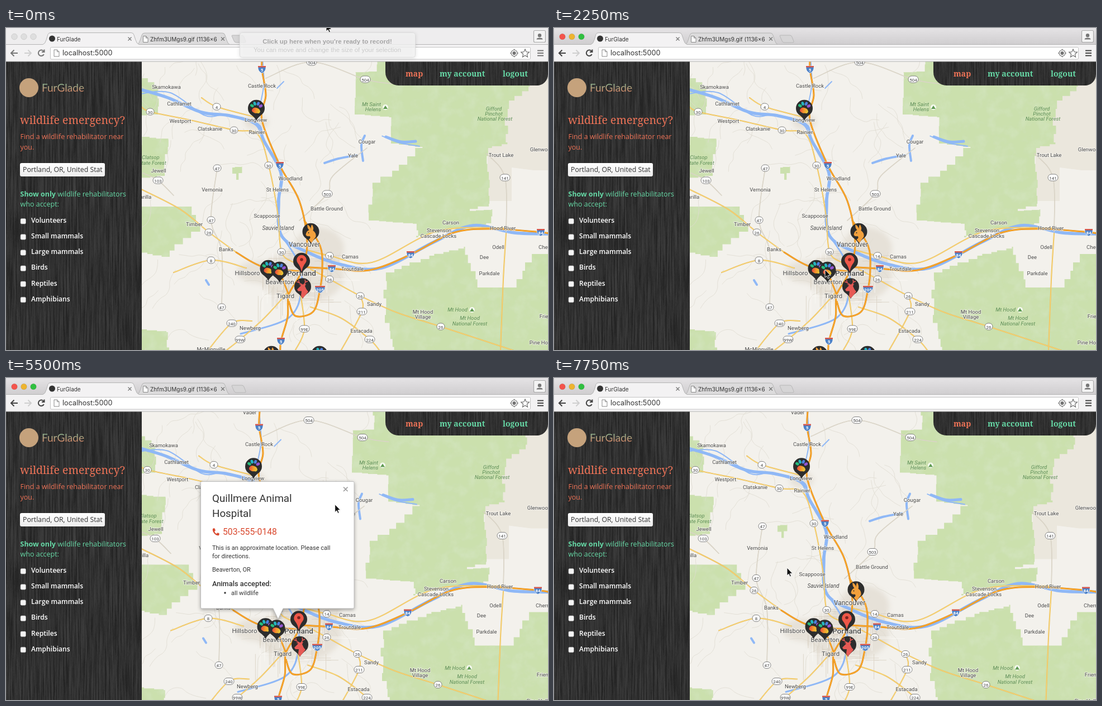
An HTML page for the animation above (8 s loop, 970 by 577 pixels).

```html
<!DOCTYPE html>
<html lang="en">
<head>
<meta charset="utf-8">
<title>FurGlade</title>
<style>
html, body { margin: 0; width: 100%; height: 100%; overflow: hidden; background: #f3f1ec }
svg { display: block; width: 970px; height: 577px }
text { white-space: pre }
.ui { font-family: Inter, sans-serif; fill: #333 }
.side { font-family: "Open Sans", sans-serif }
.slab { font-family: "Noto Serif", serif }
.pop { font-family: Roboto, sans-serif; fill: #333 }
.note { font: 11.45px "Liberation Sans", sans-serif; text-anchor: middle }
#labels text { font-family: Roboto, sans-serif; text-anchor: middle; fill: #4b4b4b; stroke: #f8f6f2; stroke-width: 2px; stroke-opacity: .7; paint-order: stroke }
#labels .park { fill: #5f8f58; font-style: italic; stroke: none }
#shields text { font: 8px Roboto, sans-serif; text-anchor: middle; fill: #444 }
#shields .us { fill: #fff; font-weight: 700 }
</style>
</head>
<body>
<svg viewBox="0 0 970 577">
<defs>
  <filter id="hills" filterUnits="userSpaceOnUse" x="230" y="30" width="760" height="570">
    <feTurbulence type="fractalNoise" baseFrequency=".045" numOctaves="4" seed="8"/>
    <feColorMatrix values="0 0 0 0 .64  0 0 0 0 .77  0 0 0 0 .5  2 0 0 0 -.85"/>
    <feComposite in2="SourceAlpha" operator="in" result="n"/>
    <feMerge><feMergeNode in="SourceGraphic"/><feMergeNode in="n"/></feMerge>
  </filter>
  <filter id="wood" filterUnits="userSpaceOnUse" x="0" y="60" width="970" height="517">
    <feTurbulence type="fractalNoise" baseFrequency=".4 .012" numOctaves="3" seed="3"/>
    <feColorMatrix values="0 0 0 0 .08  0 0 0 0 .08  0 0 0 0 .08  1 0 0 0 -.3"/>
    <feComposite in2="SourceAlpha" operator="in" result="n"/>
    <feMerge><feMergeNode in="SourceGraphic"/><feMergeNode in="n"/></feMerge>
  </filter>
  <filter id="soft"><feGaussianBlur stdDeviation="5"/></filter>
  <linearGradient id="brand" x2="0" y2="1"><stop stop-color="#74bf9b"/><stop offset="1" stop-color="#e8805f"/></linearGradient>
  <linearGradient id="field" x2="0" y2="1"><stop stop-color="#fff"/><stop offset="1" stop-color="#ececec"/></linearGradient>
  <linearGradient id="strip" x2="0" y2="1"><stop stop-color="#e5e3e5"/><stop offset="1" stop-color="#cfcdcf"/></linearGradient>
  <linearGradient id="pad"><stop stop-color="#e8483f"/><stop offset=".5" stop-color="#f59a2c"/><stop offset="1" stop-color="#e3cf3a"/></linearGradient>
</defs>

<g id="map">
  <rect x="230" y="30" width="760" height="570" fill="#f3f1ec"/>
  <g fill="#e6e1d8" filter="url(#soft)">
    <ellipse cx="530" cy="445" rx="75" ry="48"/><ellipse cx="560" cy="395" rx="45" ry="38"/><ellipse cx="455" cy="437" rx="42" ry="20"/><ellipse cx="448" cy="168" rx="22" ry="14"/>
  </g>
  <path fill="#ebe7dd" d="M890 40H980V255H945L905 250V310H862V200H890Z"/>
  <g id="forest" fill="#cbe0ad" filter="url(#hills)"></g>
  <g id="lanes" fill="none"></g>
  <g id="water" fill="none" stroke="#8fb8f6" stroke-linecap="round"></g>
  <g id="roads" fill="none" stroke-linecap="round"></g>
  <g id="shields"></g>
  <g id="labels"></g>
  <g id="pins"></g>
</g>

<g id="popup">
  <path d="M348.500 187.500a2 2 0 0 1 2-2h270.500a2 2 0 0 1 2 2v223.500a2 2 0 0 1-2 2H496l-9 19-9-19H350.500a2 2 0 0 1-2-2Z" fill="#fff" stroke="#bdbdbd" style="filter:drop-shadow(0 2px 3px #0005)"/>
  <path id="close" d="M604 195.500l7.500 7.500m0-7.500l-7.500 7.500" stroke-width="1.600"/>
  <g class="pop" font-size="11">
    <g font-size="18.800"><text x="369" y="222">Quillmere Animal</text><text x="369" y="249">Hospital</text></g>
    <path d="M370 270l3-1 2 4-2 2q1 3 4 4l2-2 3 2-1 3q-3 1-7-2-5-5-4-10Z" fill="#d9492f"/>
    <text x="388" y="281" font-size="15.700" fill="#d9492f">503-555-0148</text>
    <text x="369" y="307.500">This is an approximate location. Please call</text>
    <text x="369" y="323">for directions.</text>
    <text x="369" y="347">Beaverton, OR</text>
    <text x="369" y="372.500" font-size="12.800" font-weight="500">Animals accepted:</text>
    <circle cx="392" cy="385" r="1.700"/><text x="403" y="388.500">all wildlife</text>
  </g>
</g>

<path filter="url(#wood)" fill="#282828" d="M0 60H243V577H0ZM679 60H970V83a20 20 0 0 1-20 20H703a24 24 0 0 1-24-24Z"/>
<g class="slab" font-size="14" font-weight="600" fill="#66d9a6">
  <text x="715" y="87" fill="#ee7357">map</text><text x="776" y="87">my account</text><text x="889" y="87">logout</text>
</g>
<circle cx="41" cy="107" r="17" fill="#c5a27c"/>
<text x="64" y="114" font-family="Lato, sans-serif" font-size="19" fill="url(#brand)">FurGlade</text>
<text class="slab" x="25" y="172" font-size="19.500" fill="#ee7357">wildlife emergency?</text>
<g class="side" font-size="12.500">
  <g fill="#ee7357"><text x="25.500" y="199">Find a wildlife rehabilitator near</text><text x="25.500" y="218">you.</text></g>
  <rect x="25" y="242" width="152" height="24" rx="3" fill="url(#field)"/>
  <text x="30" y="258" font-size="12.300" fill="#333">Portland, OR, United Stat</text>
  <g fill="#66d9a6"><text x="25.500" y="301.500"><tspan font-weight="700">Show only</tspan> wildlife rehabilitators</text><text x="25.500" y="320">who accept:</text></g>
  <g id="kinds" fill="#fff" font-size="12.100" font-weight="600"></g>
</g>

<g id="chrome">
  <rect id="bar" width="970" height="30"/>
  <path d="M234 30q4-1 6-8l3-9q1-4 5-4H387q4 0 5 4l3 9q2 7 6 8Z" fill="#dcdbdc" stroke="#b4b4b4"/>
  <path d="M404 14q0-1 2-1h16q3 0 4 3l3 8q1 2-2 2H412q-3 0-4-3Z" fill="#d6d5d6" stroke="#b8b8b8"/>
  <path d="M-1 60V29.500H66q4-1 6-8l3-10q1-3 5-3H224q4 0 5 4l3 9q2 7 6 8H971V60Z" fill="#f3f2f3" stroke="#b4b4b4"/>
  <g id="lights" stroke-width=".8"></g>
  <circle cx="82.500" cy="19" r="5.500" fill="#333"/>
  <g class="ui" font-size="10"><text x="91" y="23.500">FurGlade</text><text x="258" y="23.500">Zhfm3UMgs9.gif (1136×6</text></g>
  <path d="M218.500 16.500l6 6m0-6l-6 6M385 16.500l6 6m0-6l-6 6" stroke="#777" stroke-width="1.300"/>
  <rect x="79.500" y="34.500" width="859" height="21.500" rx="2" fill="#fff" stroke="#c3c3c3"/>
  <path d="M245.500 14.500h5l3.500 3.500v7.500h-8.500ZM250.500 14.500v3.500h3.500M86 39h5.500l3.500 3.500v8.500h-9ZM91.500 39v3.500h3.500" fill="#fff" stroke="#888"/>
  <text class="ui" x="101" y="49" font-size="12.700">localhost:5000</text>
  <g id="tools" fill="none" stroke-width="2">
    <path d="M21 45H9M14.500 39.500L9 45l5.500 5.500"/>
    <path d="M33 45H45M39.500 39.500L45 45l-5.500 5.500" stroke="#cfcfcf"/>
    <path d="M67.500 42A5.200 5.200 0 1 0 67.800 47M68.500 38.500V43H64M951 40.500H962M951 45H962M951 49.500H962"/>
  </g>
  <g fill="none" stroke="#6d6d6d" stroke-width="1.200">
    <circle cx="909.500" cy="45" r="5.500"/><circle cx="909.500" cy="45" r="2.500" fill="#777"/>
    <path d="M902 45h2m11 0h2M909.500 37.500v2m0 11v2"/>
    <path d="M929 38l2.100 4.800 5.200.5-3.900 3.500 1.100 5.100-4.500-2.700-4.500 2.700 1.100-5.100-3.900-3.500 5.200-.5Z"/>
    <rect x="944.500" y="4.500" width="21" height="21" rx="2" fill="#f3f3f3" stroke="#aaa"/>
  </g>
  <path d="M955 10a3 3 0 0 1 0 6.400 3 3 0 0 1 0-6.400M949.500 20.500q0-3 5.500-3t5.500 3Z" fill="#777"/>
</g>
<g id="notice">
  <rect x="418.500" y="8.500" width="314" height="44" rx="4" fill="#f4f4f4" fill-opacity=".82" stroke="#ddd" style="filter:drop-shadow(0 1px 3px #0002)"/>
  <g class="note"><text x="575" y="28" font-weight="700" fill="#a5a5a5">Click up here when you're ready to record!</text><text x="575" y="43" fill="#cbcbcb">You can move and change the size of your selection</text></g>
</g>
<path id="cursor" d="M0 0V14L3.200 11.200 5.300 16 7.500 15 5.400 10.300H9.800Z" fill="#111" stroke="#fff" stroke-width=".9"/>
</svg>
<script>
const $ = id => document.getElementById(id);
const add = (id, html) => $(id).insertAdjacentHTML('beforeend', html);

let seed = 11;
const rnd = () => (seed = seed * 16807 % 2147483647) / 2147483647;
const jitter = n => (rnd() - .5) * n;
const parse = s => s.split(' ').map(q => q.split(',').map(parseFloat));

// Catmull-Rom curve through the points
function curve(p) {
  let d = 'M' + p[0];
  for (let i = 1; i < p.length; i++) {
    const a = p[i - 2] || p[i - 1], b = p[i - 1], c = p[i], e = p[i + 1] || c;
    const pull = (k, from, to, at) => at[k] + (to[k] - from[k]) / 6;
    d += `C${[0, 1].map(k => pull(k, a, c, b))} ${[0, 1].map(k => pull(k, e, b, c))} ${c}`;
  }
  return d;
}
const line = (id, p, color, w) => add(id, `<path d="${curve(p)}" stroke="${color}" stroke-width="${w}"/>`);

// Forest edges follow survey squares: ragged steps between corners
function forest(corners) {
  const p = parse(corners);
  let d = 'M' + p[0];
  p.forEach(([x, y], i) => {
    const [u, v] = p[(i + 1) % p.length];
    const n = Math.ceil(Math.max(Math.abs(u - x), Math.abs(v - y)) / 16);
    for (let k = 1; k <= n; k++) d += `H${x + (u - x) * k / n + jitter(7)}V${y + (v - y) * k / n}`;
  });
  add('forest', `<path d="${d}Z"/>`);
}
[
  '665,40 665,78 626,80 626,155 685,160 692,207 745,215 720,245 658,288 650,345 740,352 862,315 862,215 895,205 897,130 935,105 935,40',
  '735,350 750,332 870,325 870,350 800,362 735,375',
  '680,438 755,408 820,392 845,465 905,465 940,405 985,405 985,600 702,600 678,500',
  '240,195 288,200 285,265 240,270',
  '240,320 325,320 345,365 290,410 240,400',
  '240,90 275,112 270,155 240,158',
  '240,540 285,545 290,600 240,600',
  '403,250 423,248 415,272'
].forEach(forest);

// Country lanes wander, city streets form a loose grid
for (let i = 0; i < 70; i++) {
  let x = 245 + rnd() * 410, y = 50 + rnd() * 530, a = rnd() * 6.3;
  const p = [];
  for (let j = 0; j < 8; j++) {
    p.push([x, y]);
    a += jitter(1.4);
    x += 12 * Math.cos(a);
    y += 12 * Math.sin(a);
  }
  line('lanes', p, '#dfdbd1', .8);
}
for (let i = 0; i < 90; i++)
  add('lanes', `<path d="M${520 + jitter(140)} ${445 + jitter(95)}${i % 2 ? 'h' : 'v'}${15 + rnd() * 35}" stroke="${i % 3 ? '#d9d0c2' : '#fbfaf7'}" stroke-width=".8"/>`);

// Wide rivers get a thin side channel that weaves around them
function river(w, pts) {
  const p = parse(pts);
  line('water', p, '#8fb8f6', w);
  if (w > 4) line('water', p.slice(0, 8).map(([x, y]) => [x + jitter(14), y + jitter(18)]), '#8fb8f6', 2);
}
river(5.5, '240,110 290,125 350,151 400,157 447,172 462,203 492,260 488,310 493,372 540,402 600,424 672,430 765,384 835,354 910,367 980,369');
river(3, '493,372 523,420 529,470 505,520 420,548');
river(2, '458,45 461,105 446,170');
river(4, '570,242 595,234 628,228');
river(4, '642,193 636,210 639,238');
river(5, '680,195 707,204 733,203');
river(2, '485,108 497,96');
river(4, '358,452 363,460');

// Route sign: white oval for state roads, shield for interstates
function sign(n, [x, y], interstate) {
  const w = n.length > 2 ? 9 : 7;
  const shape = interstate
    ? `<path d="M${-w}-6H${w}Q${w + 1} 4 0 7Q${-w - 1} 4 ${-w}-6Z" fill="#4a7fc6" stroke="#fff" stroke-width=".7"/><path d="M${-w}-6H${w}V-3.500H${-w}Z" fill="#d5584d"/>`
    : `<rect x="${-w}" y="-6" width="${2 * w}" height="12" rx="6" fill="#fff" stroke="#777" stroke-width=".9"/>`;
  add('shields', `<g transform="translate(${x} ${y})">${shape}<text class="${interstate ? 'us' : ''}" y="3.500">${n}</text></g>`);
}
// Each road: route number, then points; a star puts up a sign
function roads(list, edge, fill, w, interstate) {
  for (const row of list) {
    const [n, ...stops] = row.split(' '), p = parse(stops.join(' '));
    line('roads', p, edge, w);
    line('roads', p, fill, w - 1);
    stops.forEach((s, i) => s.endsWith('*') && sign(n, p[i], interstate));
  }
}
roads([
  '504 465,90 547,61* 643,92* 690,100',
  '503 525,345 575,297* 585,265 646,215',
  '47 378,251* 367,344* 386,400 386,500*',
  '103 245,260 272,273* 300,300',
  '141 860,225 893,268* 895,365'
], '#d3cdbf', '#e4dfd4', 1.6);
roads([
  '30 240,139 258,150* 330,165 408,183* 450,190 470,246* 486,330 493,401* 515,420',
  '4 350,125 377,141* 447,160',
  '26 240,288 312,325 363,366* 412,402',
  '8 300,438 367,416* 430,430',
  '14 540,398 579,408* 655,420 772,364 890,358',
  '26 545,432 579,450* 634,480* 700,510 778,535* 915,580',
  '99W 503,475 462,520 419,558* 395,577',
  '99E 526,470 534,539* 518,577',
  '240 440,525 404,529* 362,577',
  '211 634,480 637,508* 600,577',
  '224 545,500 600,520 651,558* 670,580',
  '35 895,368 890,450 885,577'
], '#e6b655', '#fbd978', 2.1);
roads(['26 412,402 460,428 527,436', '217 489,435 506,478'], '#dc8a1c', '#f9a62b', 2.8);
roads([
  '5 459,45 458,74* 465,120 458,165 490,246* 525,310 539,385 527,440 506,478 504,518 492,561* 491,585',
  '205 534,345 562,390 566,430 562,468* 550,508 518,516 506,490',
  '84 527,428 583,431* 650,434 724,406* 800,367 870,360 957,366* 980,370'
], '#dc8a1c', '#f9a62b', 3, true);

function label(list, size, extra = '') {
  for (const [name, x, y] of list.split('|').map(s => s.split(',')))
    add('labels', `<text x="${x}" y="${+y + size * .35}" font-size="${size}" ${extra}>${name}</text>`);
}
label('Skamokawa,287,106|Cathlamet,310,136|Westport,312,167|Clatskanie,365,181|Rainier,449,187|Longview,447,165|Castle Rock,458,104|Jewell,273,256|Vernonia,369,290|Woodland,509,270|St Helens,486,290|Scappoose,467,337|Battle Ground,574,324|Timber,337,352|Banks,394,397|Camas,616,410|Troutdale,620,432|Sandy,659,495|Estacada,636,543|Newberg,437,538|McMinnville,367,576', 9.5);
label('Cougar,646,204|Yale,621,229|Trout Lake,886,228|Glenwood,959,218|Carson,796,349|Stevenson,775,363|Cascade Locks,774,373|Hood River,889,359|Odell,881,393|Dee,856,411|Parkdale,865,440|Mt Hood,746,509|Village,746,518|Cherryville,975,393|Friend,968,517|Pine Hollow,962,564|arilla,250,303|Vader,441,47', 9.5);
label('Sauvie Island,487,358', 10, 'font-style="italic"');
label('Vancouver,534,388', 12);
label('Hillsboro,432,439|Beaverton,490,455|Tigard,500,480', 11.3);
label('Portland,529,439', 13.6, 'font-weight="500"');
label('Mt Saint,654,137|Helens,657,146|Gifford,873,145|Pinchot,873,154|National Forest,875,163|Clatsop,259,232|State Forest,262,242|Mt Hood,808,505|Mt Hood,830,520|National Forest,830,530', 9.5, 'class="park"');
for (const [x, y] of [[679, 142], [834, 505]])
  add('labels', `<circle cx="${x}" cy="${y}" r="5" fill="#fff" fill-opacity=".8"/><path d="M${x - 4} ${y + 3}l4-6 4 6Z" fill="#5f9a52"/>`);

// Map markers
const toes = ['#27bd7c', '#25b5c0', '#4e80dd', '#9355d2'].map((c, i) =>
  `<ellipse cy="-9" rx="2.500" ry="3.500" transform="rotate(${i * 40 - 70})" fill="${c}"/>`).join('');
const icons = {
  paw: `<g transform="rotate(12)"><path d="M-7 3q2-5 7-4 6 0 8 5 0 5-5 4-4 2-7 0-4-1-3-5Z" fill="url(#pad)"/>${toes}</g>`,
  rabbit: '<path d="M-6-13Q0-9 0-4 0-10 2-13 6-7 4-2 10 2 9 9L1 20-4 14Q1 11-2 8-8 9-9 5-8-1-3-3-7-7-6-13Z" fill="#f2a03c"/><circle cx="-4" cy="2" r="1" fill="#2b2b2b"/>',
  deer: '<path d="M-10 5L-3-2-7-4 0-4 6-5 4-1Q6 5 10 9L0 21-3 16-2 8-8 8Z" fill="#e65a55"/><path d="M-1-4Q-8-6-7-12M-6-7-11-9M2-4Q6-7 4-13M5-8 9-10" fill="none" stroke="#e65a55" stroke-width="1.600"/>',
  place: '<path d="M0 19Q-2 9-7 3A8.800 8.800 0 1 1 7 3Q2 9 0 19Z" fill="#ee5748"/><circle cy="-3" r="2.800" fill="#7d2420"/>'
};
for (const [kind, x, y] of [['paw', 448, 144], ['rabbit', 545.5, 365], ['place', 529, 418], ['paw', 469.5, 431], ['paw', 489.5, 434], ['deer', 531, 463.5], ['rabbit', 475, 585], ['paw', 561, 585]])
  add('pins', `<g transform="translate(${x} ${y})"><path d="M0 21.500Q-3 16-10.500 10.500A15 15 0 1 1 10.500 10.500Q3 16 0 21.500Z" fill="#2d2d2d"/>${icons[kind]}</g>`);

['Volunteers', 'Small mammals', 'Large mammals', 'Birds', 'Reptiles', 'Amphibians'].forEach((name, i) => {
  const y = 349 + i * 28.15;
  add('kinds', `<rect x="26" y="${y - 7.5}" width="9.500" height="9.500" rx="2" fill="#f4f4f4" stroke="#aaa" stroke-width=".6"/><text x="45" y="${y}">${name}</text>`);
});
const lamps = ['#f4544c', '#eeb42f', '#2fc03f'];
lamps.forEach((c, i) => add('lights', `<circle cx="${15 + 17 * i}" cy="15.500" r="5.300"/>`));

// Pointer stops: time, x, y
const stops = [[0, 573, -8], [750, 570, -2], [1000, 550, 79], [1250, 528, 333], [2000, 485, 433], [4600, 485, 433], [5750, 603, 198], [6500, 604, 201], [7500, 604, 201], [7750, 417, 340]];
function pointer(t) {
  const i = stops.findIndex(s => s[0] > t);
  if (i < 0) return stops[stops.length - 1].slice(1);
  const [a, x, y] = stops[i - 1], [b, u, v] = stops[i];
  const p = (t - a) / (b - a), e = p * p * (3 - 2 * p);
  return t < 750 ? [x, y] : [x + (u - x) * e, y + (v - y) * e];
}

const show = (id, on) => $(id).setAttribute('visibility', on ? 'visible' : 'hidden');
const set = (id, key, value) => $(id).setAttribute(key, value);

let last = -1;
function draw(now) {
  requestAnimationFrame(draw);
  const t = Math.floor(now % 8000 / 250) * 250;
  if (t === last) return;
  last = t;
  const active = t >= 2250;
  set('cursor', 'transform', `translate(${pointer(t)})`);
  set('map', 'transform', t < 3000 ? '' : 'translate(-5 14.500)');
  show('popup', t >= 3000 && t < 7250);
  show('notice', t < 250);
  set('close', 'stroke', t >= 5750 ? '#444' : '#999');
  set('bar', 'fill', active ? 'url(#strip)' : '#eeedee');
  set('tools', 'stroke', active ? '#444' : '#777');
  set('lights', 'stroke', active ? '#0002' : '#c9c9c9');
  lamps.forEach((c, i) => $('lights').children[i].setAttribute('fill', active ? c : '#dedede'));
}
requestAnimationFrame(draw);
</script>
</body>
</html>
```
